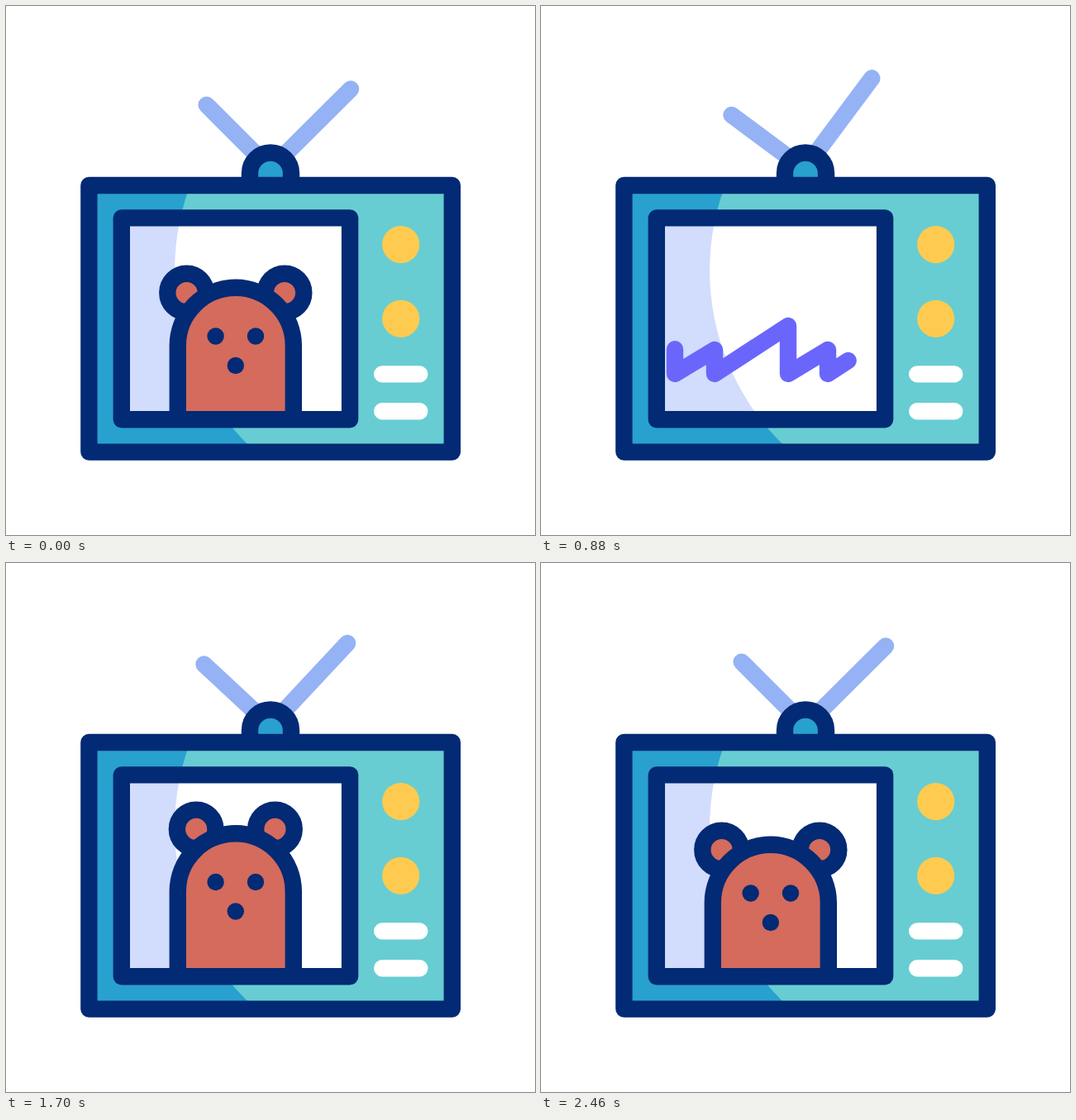
Animation of 640 by 640 pixels, one loop 3600 ms. Source, as an HTML page:

```html
<!DOCTYPE html>
<html lang="en">
<head>
<meta charset="utf-8">
<title>Television</title>
<style>
  html, body { margin: 0; height: 100%; overflow: hidden; background: #fff; }
  svg { display: block; width: 100%; height: 100%; }
  .line { stroke: #032a74; stroke-width: 20.4; stroke-linejoin: round; }
  .round { fill: none; stroke-width: 20.4; stroke-linecap: round; stroke-linejoin: round; }
  .fur { fill: #d46b5d; }
  .ink { fill: #032a74; }
</style>
</head>
<body>
<svg viewBox="0 0 640 640">
  <defs>
    <clipPath id="body"><rect x="100" y="217" width="440" height="323"/></clipPath>
    <clipPath id="screen"><rect x="140" y="256" width="276" height="244"/></clipPath>
  </defs>

  <path id="antenna" class="round" stroke="#95b2f5" d="M242.6 119.6L320 197L417 100.4"/>
  <path class="line" fill="#28a1cf" d="M295 212V202.5a25 25 0 0 1 50 0V212"/>

  <g clip-path="url(#body)">
    <rect x="100" y="217" width="440" height="323" fill="#28a1cf"/>
    <circle cx="498.7" cy="320" r="294.6" fill="#67cdd2"/>
  </g>
  <rect class="line" fill="none" x="100.4" y="217" width="439.4" height="322.6"/>

  <g clip-path="url(#screen)">
    <rect x="140" y="256" width="276" height="244" fill="#d2dcfd"/>
    <circle cx="498.7" cy="320" r="294.6" fill="#fff"/>
    <path id="signal" class="round" stroke="#6a66fb" pathLength="1"
      d="M73 445L162 387V445L210 416V445L299 387V445L347 416V445L436 387"/>
    <g id="bear">
      <circle id="earL" class="fur line" cx="218.6" cy="347" r="23.3"/>
      <circle id="earR" class="fur line" cx="337" cy="347" r="23.3"/>
      <path class="fur line" d="M207.8 700V410.7a70 70 0 0 1 140 0V700"/>
      <circle class="ink" cx="253.6" cy="399.5" r="10.2"/>
      <circle class="ink" cx="302" cy="399.5" r="10.2"/>
      <circle class="ink" cx="277.8" cy="435" r="10.2"/>
    </g>
  </g>
  <rect class="line" fill="none" x="139.8" y="256.4" width="276.3" height="243.9"/>

  <circle cx="477.7" cy="288.6" r="22.6" fill="#fecb50"/>
  <circle cx="477.7" cy="378.3" r="22.6" fill="#fecb50"/>
  <path class="round" stroke="#fff" d="M455.2 445.4H500.2M455.2 490.2H500.2"/>
</svg>
<script>
  const LOOP = 3600;
  const el = id => document.getElementById(id);
  const put = (id, value) => el(id).setAttribute('transform', value);
  const ease = p => p < 0.5 ? 4 * p ** 3 : 1 - 4 * (1 - p) ** 3;
  const ramp = (t, from, to) => ease(Math.min(1, Math.max(0, (t - from) / (to - from))));

  // Eased value at time t through [time, value] keys
  function track(t, keys) {
    let value = keys[0][1];
    for (let i = 1; i < keys.length; i++) {
      const [t0, v0] = keys[i - 1], [t1, v1] = keys[i];
      value += (v1 - v0) * ramp(t, t0, t1);
    }
    return value;
  }

  const swing = [[0, 0], [595, -30], [1205, 22.3], [1820, -2.8], [2160, 0]];
  const duck = [[0, 0], [450, 186], [1050, 186], [1500, -16.2], [2080, 0]];
  const perk = [[1500, 0], [1800, 13.5], [2400, 0]];

  function draw(now) {
    const t = now % LOOP;
    put('antenna', `rotate(${track(t, swing)} 320 207.3)`);
    put('bear', `translate(0 ${track(t, duck)})`);

    const lift = track(t, perk);
    put('earL', `translate(${lift} ${-lift})`);
    put('earR', `translate(${-lift} ${-lift})`);

    const head = ramp(t, 471, 1071), tail = ramp(t, 652, 1252);
    const signal = el('signal').style;
    signal.strokeDasharray = `${head - tail} 2`;
    signal.strokeDashoffset = -tail;

    requestAnimationFrame(draw);
  }
  requestAnimationFrame(draw);
</script>
</body>
</html>
```
